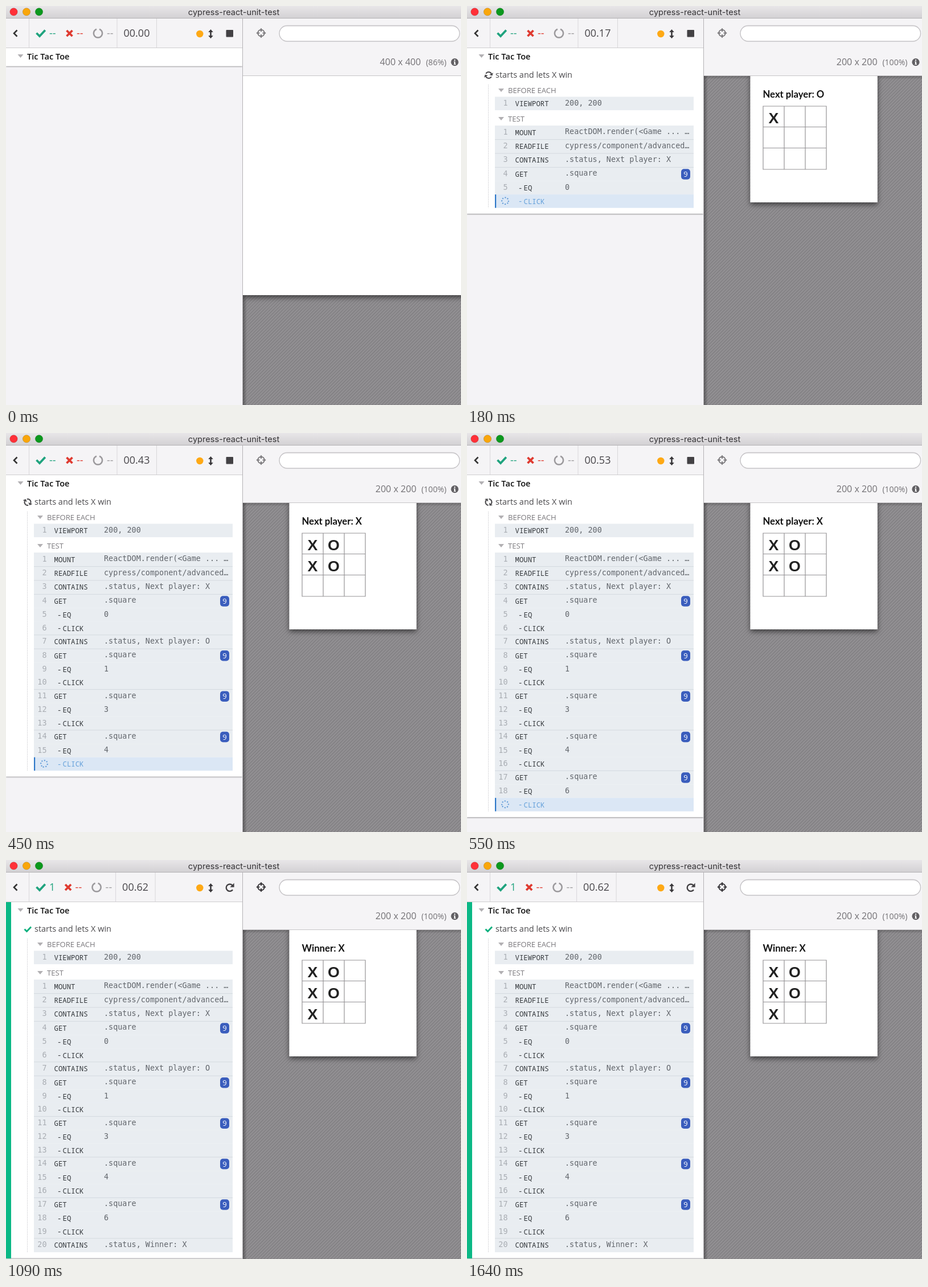
Write an HTML page that moves like this. It is 799 px wide and 701 px high and loops after 1730 ms.

```html
<!DOCTYPE html>
<html lang="en">
<head>
<meta charset="utf-8">
<title>Component test run</title>
<style>
html, body { margin: 0; width: 100%; height: 100%; overflow: hidden; background: #f4f3f6; }
svg { display: block; width: 799px; height: 701px; }
text { font-family: "Open Sans", "Noto Sans", sans-serif; white-space: pre; }
.line { fill: none; stroke: currentColor; }
.solid { fill: currentColor; }
.title { font: 14.6px Inter, sans-serif; fill: #353336; text-anchor: middle; }
.stat { font-size: 18px; fill: currentColor; }
.clock { font-size: 18px; fill: #48464a; }
.suite { font-size: 14.6px; font-weight: 600; fill: #111; }
.test { font-size: 14.5px; fill: #4b4a4d; }
.hook { font-size: 13.1px; fill: #7b797d; }
.size { font-size: 16.1px; fill: #737175; }
.scale { font-size: 14.1px; fill: #737175; text-anchor: end; }
.status { font: bold 16.7px Lato, sans-serif; fill: #111; }
.mark { font: bold 26.7px "Liberation Sans", Arial, sans-serif; fill: #222; text-anchor: middle; }
.num, .msg { font: 13.45px "DejaVu Sans Mono", monospace; }
.num { fill: #a9adb3; text-anchor: end; }
.msg { fill: #62666c; }
.name { font: 500 12.3px "Noto Sans Mono", monospace; fill: #34383c; }
.badge { font-size: 13px; fill: #fff; text-anchor: middle; }
.bg { fill: #e9edf1; }
.bar, .dots { display: none; }
.pending .bg { fill: #dbe7f5; }
.pending .name { fill: #64a0da; }
.pending .num { display: none; }
.pending .bar, .pending .dots { display: inline; }
.running .done, .finished .busy { display: none; }
</style>
</head>
<body>
<svg id="app" class="running" viewBox="0 0 799 701">
  <defs>
    <linearGradient id="chrome" x2="0" y2="1">
      <stop stop-color="#e8e6e8"/><stop offset="1" stop-color="#d2d0d3"/>
    </linearGradient>
    <linearGradient id="fadeX"><stop stop-opacity=".35"/><stop offset="1" stop-opacity="0"/></linearGradient>
    <linearGradient id="fadeY" x2="0" y2="1"><stop stop-opacity=".22"/><stop offset="1" stop-opacity="0"/></linearGradient>
    <pattern id="stripes" width="3.946" height="3.946" patternUnits="userSpaceOnUse" patternTransform="translate(416 123) rotate(45)">
      <rect width="3.946" height="3.946" fill="#929093"/><rect width="1.2" height="3.946" fill="#7d7b7e"/>
    </pattern>
    <filter id="drop" x="-20%" y="-20%" width="140%" height="140%">
      <feDropShadow dx="0" dy="4" stdDeviation="5" flood-opacity=".55"/>
    </filter>
    <filter id="soft" x="-5%" y="-5%" width="110%" height="110%">
      <feDropShadow dx="0" dy="1" stdDeviation="1" flood-opacity=".45"/>
    </filter>
    <clipPath id="stageClip"><rect x="416" y="123" width="383" height="578"/></clipPath>
    <clipPath id="listClip"><rect y="74" width="415" height="627"/></clipPath>
  </defs>

  <rect width="799" height="701" fill="#f4f3f6"/>

  <g clip-path="url(#stageClip)">
    <rect x="416" y="123" width="383" height="578" fill="url(#stripes)"/>
    <rect x="416" y="123" width="7" height="578" fill="url(#fadeX)"/>
    <rect x="416" y="123" width="383" height="6" fill="url(#fadeY)"/>
    <rect id="frame" y="118" fill="#fff" filter="url(#drop)"/>
    <g id="game">
      <text id="status" class="status" x="519.5" y="161"/>
      <path d="M520 176h111v111h-111zM557 176v111M594 176v111M520 212.5h111M520 249.5h111" fill="none" stroke="#959396" stroke-width="1.2"/>
      <g id="marks"></g>
    </g>
  </g>

  <g clip-path="url(#listClip)">
    <rect id="panel" y="70" width="415" fill="#fff" filter="url(#soft)"/>
    <rect class="done" y="74" width="9" height="626" fill="#0bb885"/>
    <path d="M20.5 85h10l-5 6z" fill="#b2b0b3"/>
    <text class="suite" x="37" y="94">Tic Tac Toe</text>
    <g id="body">
      <g class="busy" id="refresh" color="#4b4a4d">
        <path class="line" stroke-width="2" d="M-5.3 -1.2A5.4 5.4 0 0 1 4 -3.7M5.3 1.2A5.4 5.4 0 0 1 -4 3.7"/>
        <path class="solid" d="M6.4 -6.2v5.4h-5.4zM-6.4 6.2v-5.4h5.4z"/>
      </g>
      <path class="line done" color="#0aaf7d" stroke-width="2.8" d="M32.5 121.5l4 4 7.5 -8"/>
      <text class="test" x="50" y="126">starts and lets X win</text>
      <path id="guide" stroke="#d6d5d8" stroke-dasharray="2 1"/>
      <path d="M55 145h10l-5 6zM55 195h10l-5 6z" fill="#b2b0b3"/>
      <text class="hook" x="72" y="153">BEFORE EACH</text>
      <text class="hook" x="72" y="203">TEST</text>
      <g id="rows"></g>
    </g>
  </g>

  <rect y="22" width="415" height="51" fill="#f5f4f6"/>
  <path d="M0 73.5h415" stroke="#cfcdd0"/>
  <rect x="416" y="22" width="383" height="100" fill="#f5f4f6"/>
  <path d="M416 122.5h383" stroke="#c6c4c7"/>
  <path d="M415.5 22v679" stroke="#b4b2b5"/>

  <rect width="799" height="22" fill="url(#chrome)"/>
  <path d="M0 21.5h799" stroke="#b3b1b4"/>
  <g stroke="#000" stroke-opacity=".14">
    <circle cx="13.5" cy="10.3" r="6.7" fill="#ff3038"/>
    <circle cx="36" cy="10.3" r="6.7" fill="#f9a60b"/>
    <circle cx="58" cy="10.3" r="6.7" fill="#0b981d"/>
  </g>
  <text class="title" x="400" y="16">cypress-react-unit-test</text>

  <path d="M40.5 22v51" stroke="#d9d7da"/>
  <path class="line" color="#333" stroke-width="2.6" d="M19.5 42.5l-5.5 5.5 5.5 5.5"/>
  <g color="#1fa37e">
    <path class="line" stroke-width="3.8" d="M53.5 47.5l5.5 5.5 9.8 -10.5"/>
    <text class="stat busy" x="76" y="54">--</text>
    <text class="stat done" x="76" y="54">1</text>
  </g>
  <g id="stats">
    <path d="M195 22v51M264.5 22v51" stroke="#d9d7da"/>
    <g color="#df3a30">
      <path class="line" stroke-width="3.8" d="M106.5 43l10 10M116.5 43l-10 10"/>
      <text class="stat" x="124" y="54">--</text>
    </g>
    <g color="#9c9a9d">
      <path class="line" stroke-width="2.5" d="M164 40.8A7.6 7.6 0 1 1 159 40.8"/>
      <text class="stat" x="177" y="54">--</text>
    </g>
    <text id="clock" class="clock" x="206.5" y="54"/>
  </g>
  <circle cx="340.3" cy="49" r="6.2" fill="#fea915"/>
  <path d="M359.5 41l4.3 5h-3v6h3l-4.3 5 -4.3 -5h3v-6h-3z" fill="#3b393c"/>
  <rect class="busy" x="386.5" y="42" width="12.5" height="12.5" rx="1" fill="#434144"/>
  <g class="done" color="#434144">
    <path class="line" stroke-width="2.4" d="M397.3 44.3A6.2 6.2 0 1 0 398 52.2"/>
    <path class="solid" d="M400.6 40.5v7.3h-7.3z"/>
  </g>

  <g id="target">
    <circle class="line" cx="448" cy="47.5" r="5.8" stroke-width="1.9"/>
    <path class="line" stroke-width="2.2" d="M448 39.3v5.6M448 50.1v5.6M439.8 47.5h5.6M450.6 47.5h5.6"/>
  </g>
  <rect x="480" y="34.5" width="316.5" height="27.5" rx="13.7" fill="#fff" stroke="#c5c3c6" stroke-width="1.4"/>
  <path d="M488 36.5q2 -.8 6 -.8h288q4 0 6 .8" fill="none" stroke="#e4e3e5"/>
  <text id="size" class="size" y="104"/>
  <text id="scale" class="scale" x="773.5" y="104"/>
  <circle cx="788" cy="98.7" r="6.6" fill="#626064"/>
  <path d="M787 94.3h2v2h-2zM786.3 97.5h2.7v4.2h1v1.3h-3.7v-1.3h.8v-2.9h-.8z" fill="#fff"/>
</svg>

<script>
const $ = id => document.getElementById(id);
const LOOP = 1730, PARENT = 24.4, CHILD = 23.5;
const squares = [0, 1, 3, 4, 6];

// start ms, clock in hundredths, commands listed, moves played
const steps = [
  [0, 0, 0, 0], [90, 10, 6, 0], [180, 17, 6, 1], [270, 25, 10, 2],
  [360, 32, 13, 3], [450, 43, 16, 4], [550, 53, 19, 4], [640, 62, 20, 5]
];

const commands = [
  ['MOUNT', 'ReactDOM.render(<Game ... …'],
  ['READFILE', 'cypress/component/advanced…'],
  ['CONTAINS', '.status, Next player: X']
];
squares.forEach((sq, i) => {
  commands.push(['GET', '.square'], ['EQ', String(sq)], ['CLICK', '']);
  if (i === 0) commands.push(['CONTAINS', '.status, Next player: O']);
});
commands.push(['CONTAINS', '.status, Winner: X']);

const esc = s => s.replace(/</g, '&lt;');
const text = (cls, x, y, s) => `<text class="${cls}" x="${x}" y="${y}">${esc(s)}</text>`;
const isChild = name => name === 'EQ' || name === 'CLICK';

function rowMarkup(n, name, msg, y, height, divider) {
  const child = isChild(name);
  return `<g transform="translate(0 ${y.toFixed(1)})">
    <rect class="bg" x="49" width="349" height="${height + 0.1}"/>
    ${divider ? '<path d="M49 .2h349" stroke="#d3d9df"/>' : ''}
    <rect class="bar" x="49" width="2.2" height="${height}" fill="#2e78c8"/>
    <g class="dots" transform="translate(67 11.3)"><circle class="spin" r="5.8" fill="none"
      stroke="#5b97d6" stroke-width="2" stroke-dasharray="2 2.555"/></g>
    ${text('num', 71.5, 15.6, String(n))}
    ${child ? text('name', 90, 16.3, '-') : ''}
    ${text('name', child ? 99.5 : 84.5, 16.5, name)}
    ${text('msg', 172, 15.3, msg)}
    ${name === 'GET' ? '<rect x="376" y="3" width="16" height="18.5" rx="5" fill="#3a5dbd"/>'
      + text('badge', 384, 16.8, '9') : ''}
  </g>`;
}

const ends = [];
let rowY = 210;
let markup = rowMarkup(1, 'VIEWPORT', '200, 200', 159.5, 23.5, false);
commands.forEach(([name, msg], i) => {
  const h = isChild(name) ? CHILD : PARENT;
  markup += rowMarkup(i + 1, name, msg, rowY, h, i > 0 && !isChild(name));
  ends.push(rowY += h);
});
$('rows').innerHTML = markup;
const rows = [...$('rows').children].slice(1);

$('marks').innerHTML = squares.map((sq, i) =>
  text('mark', 538.3 + sq % 3 * 37, 205.8 + Math.floor(sq / 3) * 37, 'XO'[i % 2])).join('');
const marks = [...$('marks').children];

const show = (el, on) => { el.style.display = on ? '' : 'none'; };
const set = (el, attrs) => { for (const k in attrs) el.setAttribute(k, attrs[k]); };

function render([start, clock, count, moves]) {
  const started = count > 0, done = count === commands.length;
  const end = started ? ends[count - 1] : 0;
  set($('app'), { class: done ? 'finished' : 'running' });
  $('clock').textContent = '00.' + String(clock).padStart(2, '0');
  set($('stats'), { transform: `translate(${done ? -2.4 : 0} 0)` });
  set($('target'), { color: done ? '#333135' : '#7b797c' });

  show($('body'), started);
  set($('panel'), { height: (started ? end + 10.2 : 105.5) - 70 });
  set($('guide'), { d: `M37.5 138V${end}` });
  rows.forEach((row, i) => {
    show(row, i < count);
    row.classList.toggle('pending', !done && i === count - 1);
  });
  const turn = (start - 90) * 0.18;
  set($('refresh'), { transform: `translate(38 121.5) rotate(${turn})` });
  document.querySelectorAll('.spin').forEach(s => set(s, { transform: `rotate(${turn * 2})` }));

  show($('game'), started);
  set($('frame'), started ? { x: 497.5, width: 223.3, height: 227 } : { x: 416, width: 390, height: 390 });
  $('status').textContent = done ? 'Winner: X' : 'Next player: ' + 'XO'[moves % 2];
  marks.forEach((m, i) => show(m, i < moves));
  $('size').textContent = started ? '200 x 200' : '400 x 400';
  set($('size'), { x: started ? 648.7 : 656.5 });
  $('scale').textContent = started ? '(100%)' : '(86%)';
}

let current;
function tick() {
  const t = performance.now() % LOOP;
  const step = steps.filter(s => s[0] <= t).pop();
  if (step !== current) render(current = step);
  requestAnimationFrame(tick);
}
tick();
</script>
</body>
</html>
```
